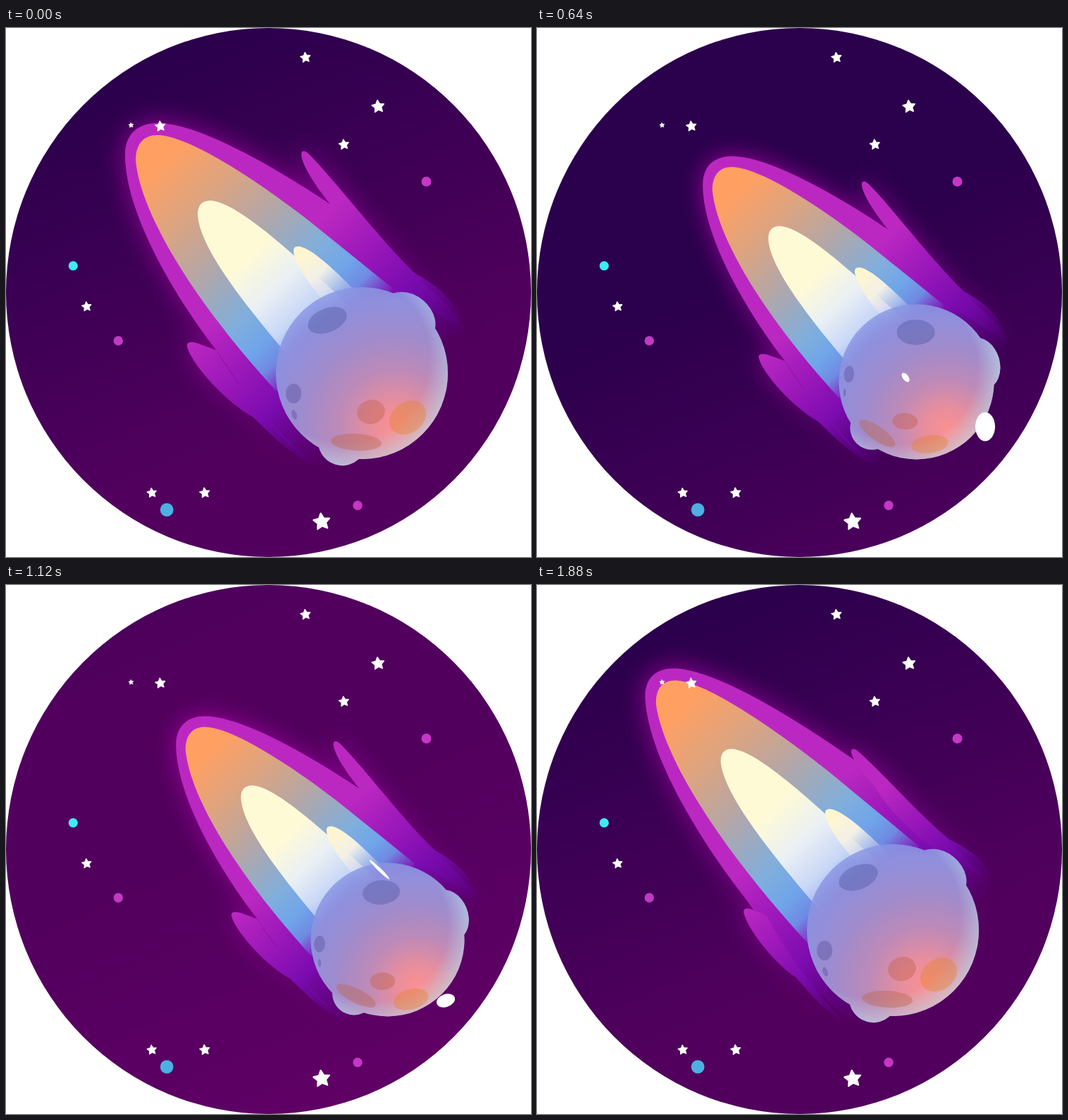
Animation, 745 px wide and 751 px high, one loop 1.92 s. Source, as an HTML page:

```html
<!DOCTYPE html>
<html lang="en">
<head>
<meta charset="utf-8">
<title>Comet</title>
<style>
  html, body { margin: 0; width: 100%; height: 100%; overflow: hidden; background: #fff; }
  svg { display: block; width: 100vw; height: 100vh; }
</style>
</head>
<body>
<svg viewBox="0 0 745 751" preserveAspectRatio="none">
  <defs>
    <linearGradient id="sky" gradientUnits="userSpaceOnUse" x1="0" y1="0" x2="596" y2="1371">
      <stop offset="0" stop-color="#2b004c"/>
      <stop offset=".37" stop-color="#52005e"/>
      <stop offset=".54" stop-color="#52005e"/>
      <stop offset="1" stop-color="#68006a"/>
    </linearGradient>
    <!-- All flame gradients share the comet axis, 550 units long -->
    <linearGradient id="axis" gradientUnits="userSpaceOnUse" x1="180" y1="145" x2="557" y2="545"/>
    <linearGradient id="magenta" href="#axis">
      <stop offset=".5" stop-color="#bb28c1"/>
      <stop offset=".64" stop-color="#9c18ba"/>
      <stop offset=".77" stop-color="#7c0cb0"/>
      <stop offset=".97" stop-color="#5a0090" stop-opacity="0"/>
    </linearGradient>
    <linearGradient id="halo" href="#axis">
      <stop offset="0" stop-color="#a800a4"/>
      <stop offset=".6" stop-color="#85008c"/>
      <stop offset="1" stop-color="#60006c" stop-opacity="0"/>
    </linearGradient>
    <linearGradient id="fire" href="#axis">
      <stop offset=".11" stop-color="#ff9f62"/>
      <stop offset=".25" stop-color="#dda480"/>
      <stop offset=".38" stop-color="#b8a6a3"/>
      <stop offset=".55" stop-color="#80aedc"/>
      <stop offset=".63" stop-color="#70a5ea"/>
      <stop offset=".69" stop-color="#6f8ae2"/>
      <stop offset=".77" stop-color="#6f70dc" stop-opacity="0"/>
    </linearGradient>
    <linearGradient id="cream" href="#axis">
      <stop offset=".44" stop-color="#fffad6"/>
      <stop offset=".55" stop-color="#eaf0f4"/>
      <stop offset=".64" stop-color="#c9d7f7"/>
      <stop offset=".78" stop-color="#b0b4f4" stop-opacity="0"/>
    </linearGradient>
    <linearGradient id="spark" href="#axis">
      <stop offset=".53" stop-color="#fff6cf"/>
      <stop offset=".6" stop-color="#f3f0e6"/>
      <stop offset=".72" stop-color="#c4ccf8" stop-opacity="0"/>
    </linearGradient>
    <radialGradient id="rock" gradientUnits="userSpaceOnUse" cx="48" cy="76" r="225">
      <stop offset="0" stop-color="#fb9092"/>
      <stop offset=".15" stop-color="#e98e9c"/>
      <stop offset=".36" stop-color="#bd8ab8"/>
      <stop offset=".58" stop-color="#a08bcc"/>
      <stop offset=".8" stop-color="#8f8fdd"/>
      <stop offset="1" stop-color="#859be8" stop-opacity=".72"/>
    </radialGradient>
    <radialGradient id="rim" gradientUnits="userSpaceOnUse" cx="-24" cy="-22" r="162">
      <stop offset=".74" stop-color="#c4dce8" stop-opacity="0"/>
      <stop offset="1" stop-color="#c4dce8" stop-opacity=".72"/>
    </radialGradient>
    <filter id="blur" filterUnits="userSpaceOnUse" x="40" y="40" width="680" height="680">
      <feGaussianBlur stdDeviation="18"/>
    </filter>
    <path id="outer" d="M440 622C390 590 340 520 298 457C235 375 169 260 169 180C169 150 188 135 215 135C270 135 370 190 460 250C520 290 560 330 600 370C630 395 645 415 650 432L505 490Z"/>
    <path id="wingR" d="M419 180C419 173 424 173 431 180C470 220 530 300 580 348C625 372 645 400 650 432L560 370C510 330 470 275 460 250C440 225 420 195 419 180Z"/>
    <path id="wingL" d="M257 452C256 446 262 445 270 447L298 457C330 510 390 580 440 622C400 605 370 570 350 552C310 530 262 475 257 452Z"/>
    <clipPath id="disc"><ellipse cx="372.5" cy="375.5" rx="372.5" ry="375.5"/></clipPath>
  </defs>

  <g clip-path="url(#disc)">
    <rect width="745" height="751" fill="url(#sky)"/>
    <g id="comet">
      <g filter="url(#blur)" fill="url(#halo)" opacity=".9">
        <use href="#outer" class="long"/><use href="#wingR" class="wr"/><use href="#wingL" class="wl"/>
      </g>
      <g fill="url(#magenta)">
        <use href="#outer" class="long"/><use href="#wingR" class="wr"/><use href="#wingL" class="wl"/>
      </g>
      <path class="long" fill="url(#fire)" d="M184 188C184 165 195 152 215 152C262 153 364 222 434 277L548 369L505 490L383 515C266 387 191 264 184 188Z"/>
      <path class="long" fill="url(#cream)" d="M272 265C272 252 278 245 290 245C322 246 386 302 436 347L496 402L430 500C362 420 275 320 272 265Z"/>
      <path class="small" fill="url(#spark)" d="M408 316C408 311 411 310 416 310C435 313 470 347 500 378L468 406C438 375 408 335 408 316Z"/>
      <g transform="translate(505 490)">
        <path id="body" fill="url(#rock)"/>
        <path id="edge" fill="url(#rim)"/>
        <g id="craters"></g>
      </g>
    </g>
    <g id="debris" fill="#fff"></g>
    <g id="stars" fill="#fff" stroke="#fff" stroke-linejoin="round"></g>
    <g id="dots">
      <circle cx="596.5" cy="218" r="7" fill="#c637c6"/>
      <circle cx="95.3" cy="337.7" r="6.6" fill="#3debf3"/>
      <circle cx="159.3" cy="444" r="6.7" fill="#c13ac4"/>
      <circle cx="228.2" cy="684" r="9.4" fill="#4eb0e2"/>
      <circle cx="499" cy="677.7" r="6.7" fill="#c637c6"/>
    </g>
  </g>
</svg>

<script>
const LOOP = 1920, STEP = 40;
const TIMES = [0, 320, 640, 960, 1120, 1440, 1880];
const $ = s => document.querySelector(s);
const mix = (a, b, k) => a + (b - a) * k;

// Smooth curve through key values, without overshoot
function curve(ts, vs, t) {
  const n = ts.length - 1;
  if (t <= ts[0]) return vs[0];
  if (t >= ts[n]) return vs[n];
  const i = ts.findIndex(x => x > t) - 1;
  const rise = j => (vs[j + 1] - vs[j]) / (ts[j + 1] - ts[j]);
  const slope = j => {
    if (j === 0 || j === n) return 0;
    const a = rise(j - 1), b = rise(j);
    return a * b <= 0 ? 0 : 2 * a * b / (a + b);
  };
  const h = ts[i + 1] - ts[i], k = (t - ts[i]) / h, q = 1 - k;
  return q * q * ((1 + 2 * k) * vs[i] + k * h * slope(i))
       + k * k * ((3 - 2 * k) * vs[i + 1] - q * h * slope(i + 1));
}
const cycle = (vs, t) => curve(TIMES, [...vs, vs[0]], t);

// x and y keys, then [rx, ry, angle] at rest and at full turn
const craters = [
  { fill: '#5058a0', x: [-49, -24, -1, -1, -10, -36], y: [-75, -84, -78, -75, -75, -74], a: [29, 17, -22], b: [30, 20, 0] },
  { fill: '#5a509c', x: [-97, -101, -106, -110, -108, -99], y: [29, 6, -12, -7, 7, 29], a: [11, 14, 0], b: [8, 13, 4] },
  { fill: '#5a509c', x: [-96, -105, -113, -113, -108, -96], y: [59, 35, 17, 24, 37, 58], a: [3.5, 7, -20], b: [2, 6, 0] },
  { fill: '#c0604c', x: [13, -1, -18, -17, -8, 10], y: [55, 58, 62, 65, 66, 60], a: [20, 17, -15], b: [20, 13, 4] },
  { fill: '#e08430', x: [65, 43, 21, 24, 37, 63], y: [63, 82, 98, 101, 95, 73], a: [28, 22, -36], b: [29, 14, -8] },
  { fill: '#b8684c', x: [-8, -35, -62, -62, -50, -21], y: [98, 92, 81, 82, 89, 99], a: [36, 12, 3], b: [34, 11, 35] }
];

const chips = [
  { t: [40, 320, 640, 880], x: [525, 574, 636, 638], y: [545, 572, 566, 580], rx: [0, 25, 14, 0], ry: [0, 25, 20.5, 0], r: [0, 0, 0, 0] },
  { t: [560, 640, 960, 1120, 1200], x: [505, 523, 605, 530, 500], y: [499, 496, 480, 404, 380], rx: [0, 4, 7, 2.3, 0], ry: [0, 7.5, 15.5, 19.5, 8], r: [-40, -38, -30, -46, -50] },
  { t: [920, 960, 1120, 1440, 1840], x: [635, 634, 624, 533, 430], y: [586, 587, 590, 589, 550], rx: [0, .8, 13.5, 23, 0], ry: [0, .8, 9, 13, 0], r: [-20, -20, -20, 20, 40] }
];

const stars = [[425, 42, 8], [528, 111.5, 9.8], [479.5, 165.5, 8], [219, 139.5, 8], [177.5, 138, 4],
  [114.5, 395.5, 7.5], [207, 660, 7.5], [282, 660, 8], [448, 701, 13]];

function starPath(x, y, r) {
  let d = '';
  for (let i = 0; i < 10; i++) {
    const a = i * Math.PI / 5 - 1.69, q = i % 2 ? r * .46 : r * .92;
    d += (i ? 'L' : 'M') + (x + q * Math.cos(a)).toFixed(2) + ' ' + (y + q * Math.sin(a)).toFixed(2);
  }
  return `<path d="${d}Z" stroke-width="${r * .17}"/>`;
}

const ellipse = (x, y, rx, ry, r, extra = '') =>
  `<ellipse rx="${Math.max(0, rx)}" ry="${Math.max(0, ry)}" transform="translate(${x} ${y}) rotate(${r})" ${extra}/>`;

// Closed ellipse whose first radius follows the rock's outline
function bump(deg, dist, wide, tall) {
  const a = deg * Math.PI / 180, c = Math.cos(a), s = Math.sin(a);
  const end = k => `${dist * c - k * wide * s} ${dist * s + k * wide * c}`;
  const arc = `A${wide} ${tall} ${deg + 90} 1 1 `;
  return `M${end(1)}${arc}${end(-1)}${arc}${end(1)}Z`;
}

function rockPath(t) {
  const right = -50 + cycle([0, 17, 34, 34, 28, 3], t);
  const low = 106 + cycle([0, 15, 28, 25, 16, 2], t);
  return bump(0, 0, 122, 122) + bump(right, 103, 42, 32) + bump(low, 102, 34, 33);
}

function stretch(sel, x, y, sx, sy, turn = 0) {
  const m = `translate(${x} ${y}) rotate(${turn}) scale(${sx} ${sy}) rotate(${-turn}) translate(${-x} ${-y})`;
  document.querySelectorAll(sel).forEach(e => e.setAttribute('transform', m));
}

function draw(t) {
  const shift = cycle([130, 520, 430, -60, -350, -650], t);
  $('#sky').setAttribute('gradientTransform', `translate(${shift * .4} ${shift * .92})`);

  const away = cycle([0, .213, .88, 1, .96, .44], t);
  $('#comet').setAttribute('transform',
    `translate(${505 + 38 * away} ${490 + 14 * away}) scale(${1 - .111 * away}) translate(-505 -490)`);

  // Quick flame flicker: the tail lengthens along its axis while the wings shorten
  const f = Math.sin(Math.PI * (t % 160) / 160) * Math.SQRT2;
  stretch('.long', 505, 490, 1 + .053 * f, 1 - .05 * f, 46.7);
  stretch('.wr', 620, 400, 1 - .134 * f, 1 - .258 * f);
  stretch('.wl', 430, 610, 1 - .21 * f, 1 - .08 * f);
  stretch('.small', 505, 490, 1 - .01 * f, 1 - .044 * f);

  const d = rockPath(t);
  $('#body').setAttribute('d', d);
  $('#edge').setAttribute('d', d);

  const turn = cycle([0, .5, 1, .97, .75, .15], t);
  $('#craters').innerHTML = craters.map(c => {
    const [rx, ry, r] = c.a.map((v, i) => mix(v, c.b[i], turn));
    return ellipse(cycle(c.x, t), cycle(c.y, t), rx, ry, r, `fill="${c.fill}" opacity=".42"`);
  }).join('');

  $('#debris').innerHTML = chips.filter(c => t > c.t[0] && t < c.t[c.t.length - 1])
    .map(c => ellipse(...['x', 'y', 'rx', 'ry', 'r'].map(k => curve(c.t, c[k], t)))).join('');
}

$('#stars').innerHTML = stars.map(s => starPath(...s)).join('');

function tick() {
  draw(Math.floor(performance.now() % LOOP / STEP) * STEP);
  requestAnimationFrame(tick);
}
tick();
</script>
</body>
</html>
```
